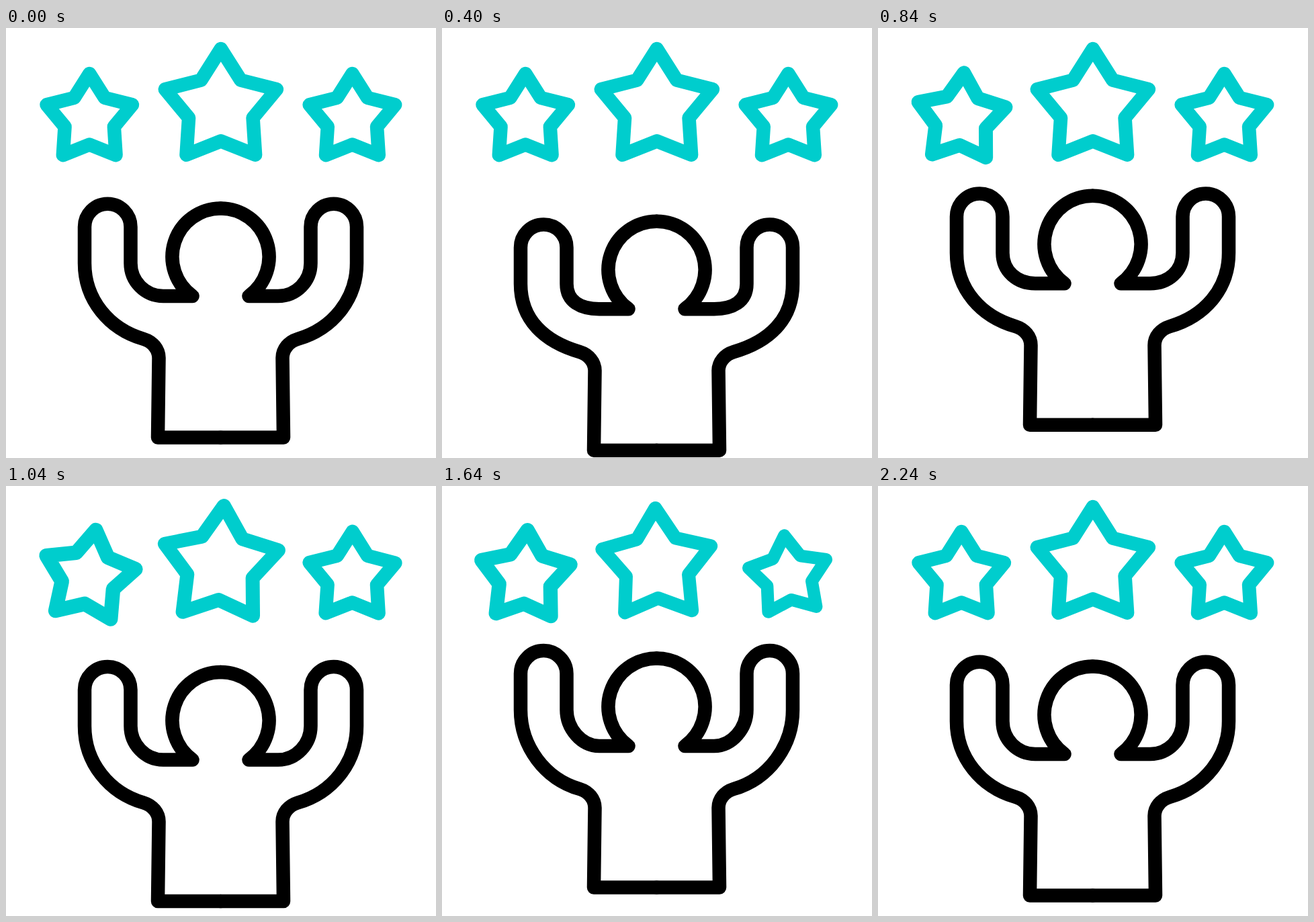
An HTML page that plays this animation: 640 by 640 pixels, repeating every 2480 ms.

```html
<!DOCTYPE html>
<html lang="en">
<head>
<meta charset="utf-8">
<title>Cheering figure with three stars</title>
<style>
  html, body { margin: 0; width: 100%; height: 100%; overflow: hidden; background: #fff; }
  svg { display: block; width: 100vw; height: 100vh; }
  path { fill: none; stroke-width: 20.5; stroke-linecap: round; stroke-linejoin: round; }
  #half { stroke: #000; }
  .star { stroke: #00cdcd; }
</style>
</head>
<body>
<svg viewBox="0 0 640 640">
  <path id="half"/>
  <use href="#half" transform="translate(639) scale(-1 1)"/>
</svg>
<script>
const LOOP = 2480, STEP = 40, LAST = 2240;
const svg = document.querySelector('svg');
const half = document.getElementById('half');

// Swings from rest through each peak, one per beat, and back to rest
function swing(t, beat, ...peaks) {
  const n = Math.floor(t / beat), u = t / beat - n;
  const from = peaks[n - 1] || 0, to = peaks[n] || 0;
  return from + (to - from) * u * u * (3 - 2 * u);
}

function starPath(r) {
  const points = Array.from({ length: 10 }, (_, i) => {
    const a = i * Math.PI / 5, q = i % 2 ? r * 0.575 : r;
    return `${q * Math.sin(a)} ${-q * Math.cos(a)}`;
  });
  return `M${points.join('L')}Z`;
}

function makeStar(x, y, r, start, gain) {
  const el = document.createElementNS('http://www.w3.org/2000/svg', 'path');
  el.setAttribute('class', 'star');
  el.setAttribute('d', starPath(r));
  svg.append(el);
  return { el, x, y, start, gain, lift: r * 0.094 };
}

const stars = [
  makeStar(124.2, 135, 67, 710, 1),
  makeStar(319.8, 118.2, 87.3, 885, 0.72),
  makeStar(515.4, 135, 67, 1008, 1)
];

function drawStar({ el, x, y, start, gain, lift }, t) {
  const turn = gain * swing(t - start, 308, 8.8, -6.3, 2.8);
  const size = 1 + gain * swing(t - start, 308, 0.055, -0.09, 0.04);
  el.setAttribute('transform',
    `translate(${x} ${y - lift}) rotate(${turn}) scale(${size}) translate(0 ${lift})`);
}

// Left half of the figure; T points follow the torso, H points the hand
function drawFigure(torso, hand) {
  const T = (x, y) => `${x} ${y + torso} `;
  const H = (x, y) => `${x} ${y + hand} `;
  half.setAttribute('d',
    'M' + T(319.5, 268.5) + 'A72 72 0 0 0 ' + T(277.5, 399) + 'L' + T(234, 399) +
    'C' + T(207, 399) + H(185.5, 377) + H(185.5, 350) +
    'L' + H(185.5, 296) + 'A34.25 34.25 0 0 0 ' + H(117, 296) + 'L' + H(117, 350) +
    'C' + H(117, 404) + T(153, 448) + T(205, 463) +
    'C' + T(218, 467) + T(227.5, 478) + T(227.5, 491) +
    'L' + T(226, 609.5) + 'L' + T(319.5, 609.5));
}

function draw(ms) {
  const t = Math.min(LAST, Math.floor(ms / STEP) * STEP);
  drawFigure(swing(t, 370, 20, -25.5, 12, -20), swing(t, 385, 31, -18, 14, -20));
  stars.forEach(star => drawStar(star, t));
}

const start = performance.now();
function tick() {
  draw((performance.now() - start) % LOOP);
  requestAnimationFrame(tick);
}
tick();
</script>
</body>
</html>
```
